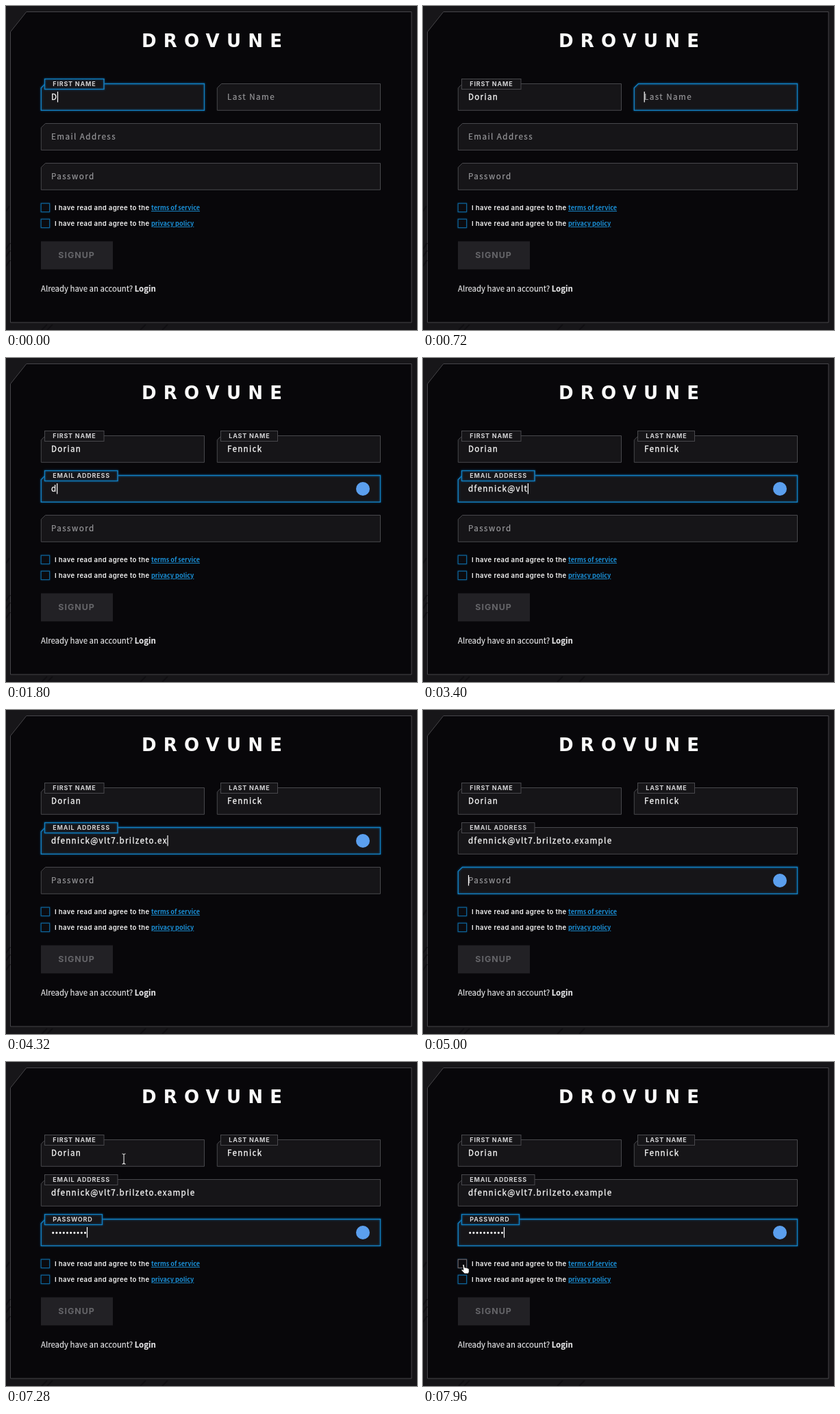
An HTML page for the animation above (8 s loop, 600x473 px).

```html
<!DOCTYPE html>
<html lang="en">
<head>
<meta charset="utf-8">
<title>Signup form</title>
<style>
  html, body { margin: 0; width: 100%; height: 100%; overflow: hidden; background: #171619; }
  svg { display: block; width: 600px; height: 473px; }
  text { white-space: pre; }
  .body { font-family: "Noto Sans CJK JP", "Noto Sans CJK SC", "Noto Sans CJK", "Open Sans", sans-serif; }
  .ui { font-family: Inter, Roboto, sans-serif; }
  .brand { font: bold 26px "DejaVu Sans", sans-serif; letter-spacing: 10.2px; fill: #fafafa; }
  .value { font-size: 11.6px; letter-spacing: 1.3px; fill: #f6f6f6; stroke: #f6f6f6; stroke-width: .3px; }
  .hint { font-size: 11.6px; letter-spacing: 1.45px; fill: #98989b; stroke: #98989b; stroke-width: .2px; }
  .tag { font-size: 9px; font-weight: 700; letter-spacing: .8px; fill: #d0d0d2; }
  .terms { font-size: 9.6px; font-weight: 600; letter-spacing: .37px; fill: #f4f4f4; }
  .link { font-size: 9.1px; font-weight: 700; fill: #1a8fd6; text-decoration: underline; }
  .login { font-size: 11.4px; fill: #e6e6e8; stroke: #e6e6e8; stroke-width: .15px; }
  .submit { font-size: 12.4px; font-weight: 700; letter-spacing: 1px; fill: #656569; }
  .box { fill: #161518; stroke: #48484c; }
  .focus { fill: none; stroke: #1180c2; stroke-width: 1.3; filter: drop-shadow(0 0 1.8px #0a5f9c); }
  .check { fill: #0b0b0f; stroke: #0f6aa2; filter: drop-shadow(0 0 1px #0a4a78); }
  .dots { fill: none; stroke: #f6f6f6; stroke-width: 3.2; stroke-linecap: round; stroke-dasharray: 0 5.2; }
  .caret { fill: #fff; }
</style>
</head>
<body>
<svg viewBox="0 0 600 473">
  <rect width="600" height="473" fill="#171619"/>
  <path d="M29.8 8.5H592V462H6.5V37.8Z" fill="#08070a" stroke="#464549"/>
  <path d="M0 300l5-8M0 355l6-9M0 366l6-9M0 380l6-9M52 473l8-8M60 473l8-8M196 473l8-8M228 473l8-8" stroke="#100f12" stroke-width="2"/>
  <text class="brand" x="198" y="59.5">DROVUNE</text>

  <g id="fields"></g>

  <rect id="check" class="check" x="51.2" y="288.2" width="12.4" height="12.4"/>
  <rect class="check" x="51.2" y="311.2" width="12.4" height="12.4"/>
  <g class="ui terms">
    <text x="71" y="298">I have read and agree to the</text>
    <text x="71" y="321">I have read and agree to the</text>
  </g>
  <g class="body link">
    <text x="212" y="298">terms of service</text>
    <text x="212" y="321">privacy policy</text>
  </g>

  <rect x="51" y="343.5" width="105" height="41" fill="#222125"/>
  <text class="ui submit" x="76.3" y="368.4">SIGNUP</text>
  <text class="body login" x="51" y="416.5">Already have an account? <tspan font-weight="700">Login</tspan></text>

  <circle id="badge" cx="521" r="10" fill="#5b9fee"/>
  <rect id="caret" class="caret" width="1.2" height="15.5"/>

  <g id="pointer">
    <path id="beam" d="M-2.5-7.5Q0-7.5 0-5.5V5.5Q0 7.5-2.5 7.5M2.5-7.5Q0-7.5 0-5.5M0 5.5Q0 7.5 2.5 7.5" fill="none" stroke="#e4e4e4" stroke-width="1.1"/>
    <path id="arrow" d="M0 0V12L2.8 9.4 4.7 13.7 6.7 12.8 4.8 8.6H8.6Z" fill="#000" stroke="#fff" stroke-width=".9"/>
    <path id="hand" d="M-1.2 0Q0-1.6 1.2 0L2 4.4Q3.3 3.2 4.2 4.7 5.5 3.8 6.3 5.3 8 4.8 8.2 6.6L8.4 10 7.4 13H1.6L-3 8.2Q-3.4 6.4-1.6 6.8L-.2 7.8Z" fill="#fff" stroke="#000" stroke-width=".9"/>
  </g>
</svg>
<script>
const LOOP = 8000, FADE = 160, TAG_TIME = 180, DOT = 5.2;
const $ = id => document.getElementById(id);
const clamp = v => Math.min(1, Math.max(0, v));
const ease = v => v * v * (3 - 2 * v);
const ramp = (t, start, length) => ease(clamp((t - start) / length));

function add(parent, tag, attrs, text) {
  const el = document.createElementNS("http://www.w3.org/2000/svg", tag);
  for (const key in attrs) el.setAttribute(key, attrs[key]);
  if (text) el.textContent = text;
  return parent.appendChild(el);
}

// Each run is [first key time, last key time, keys]; "<" deletes one character.
function keystrokes(runs) {
  const steps = [];
  let text = "";
  for (const [from, to, keys] of runs) {
    [...keys].forEach((key, i) => {
      text = key === "<" ? text.slice(0, -1) : text + key;
      const at = from + (to - from) * i / Math.max(1, keys.length - 1);
      steps.push({ at: Math.round(at / 40) * 40, text });
    });
  }
  return steps;
}

const fields = [
  { name: "First Name", x: 51, y: 113, w: 239, tagW: 86.5, on: -1000, off: 560, tagAt: -1000,
    runs: [[0, 0, "D"], [40, 400, "orian"]] },
  { name: "Last Name", x: 308, y: 113, w: 239, tagW: 83, on: 560, off: 1440, tagAt: 800,
    runs: [[800, 1240, "Fennick"]] },
  { name: "Email Address", x: 51, y: 171, w: 496, tagW: 106.5, on: 1440, off: 4840, tagAt: 1600, badge: true,
    runs: [[1600, 1600, "d"], [1840, 2200, "fen"], [2280, 2440, "nick"], [2720, 2720, "@"],
           [2880, 2960, "vmo"], [3120, 3400, "<<lt"], [3560, 4320, "7.brilzeto.ex"], [4440, 4680, "ample"]] },
  { name: "Password", x: 51, y: 229, w: 496, tagW: 84, on: 4840, off: Infinity, tagAt: 5560, badge: true, secret: true,
    runs: [[5560, 5560, "*"], [5680, 6000, "****"], [6200, 6200, "*"], [6400, 6680, "<****"], [6840, 6840, "*"]] }
];

function build(f) {
  const { x, y, w } = f, g = add($("fields"), "g", {});
  const outline = `M${x + 6.5} ${y + .5}H${x + w - .5}V${y + 39.3}H${x + .3}V${y + 6.5}Z`;
  add(g, "path", { class: "box", d: outline });
  f.ring = add(g, "path", { class: "focus", d: outline });
  f.hint = add(g, "text", { class: "body hint", x: x + 15, y: y + 24.3 }, f.name);
  f.value = f.secret
    ? add(g, "path", { class: "dots" })
    : add(g, "text", { class: "body value", x: x + 15, y: y + 24.3 });
  f.tag = add(g, "g", {});
  const rect = { x: x + 5.5, y: y - 6.5, width: f.tagW, height: 15 };
  add(f.tag, "rect", { class: "box", ...rect });
  f.tagRing = add(f.tag, "rect", { class: "focus", ...rect });
  add(f.tag, "text", { class: "ui tag", x: x + 17.3, y: y + 4.1 }, f.name.toUpperCase());
  f.steps = keystrokes(f.runs);
  f.text = null;
}

// Shows the typed text and keeps its width for the caret.
function setText(f, text) {
  if (text === f.text) return;
  f.text = text;
  f.hint.style.display = text ? "none" : "";
  if (f.secret) {
    const n = text.length;
    f.value.setAttribute("d", n ? `M${f.x + 17.7} ${f.y + 20.3}h${(n - 1) * DOT + .01}` : "");
    f.width = n * DOT + .3;
  } else {
    f.value.textContent = text;
    f.width = text ? f.value.getComputedTextLength() : 0;
  }
}

function drawField(f, t) {
  const focus = ramp(t, f.on, FADE) * (1 - ramp(t, f.off, FADE));
  const shown = ramp(t, f.tagAt, TAG_TIME);
  const last = f.steps.filter(s => s.at <= t).pop();
  setText(f, last ? last.text : "");
  f.ring.style.opacity = f.tagRing.style.opacity = focus;
  f.tag.style.opacity = shown;
  f.tag.setAttribute("transform", `translate(0 ${8 * (1 - shown)})`);
}

function drawPointer(t) {
  const k = ramp(t, 7100, 850);
  const x = 187 - 128 * k, y = 121 + 175 * k;
  const overCheck = x < 66 && y > 286;
  const overField = fields.some(f => x > f.x && x < f.x + f.w && y > f.y && y < f.y + 40);
  const kind = overCheck ? "hand" : overField ? "beam" : "arrow";
  for (const id of ["beam", "arrow", "hand"]) $(id).style.display = id === kind ? "" : "none";
  $("pointer").style.display = t < 7120 ? "none" : "";
  $("pointer").setAttribute("transform", `translate(${x} ${y})`);
  $("check").style.stroke = overCheck && t >= 7120 ? "#7c6c6a" : "";
}

function draw(t) {
  fields.forEach(f => drawField(f, t));
  const active = fields.find(f => t >= f.on && t < f.off);
  $("caret").setAttribute("x", active.x + 15 + active.width - .4);
  $("caret").setAttribute("y", active.y + 12);
  $("badge").setAttribute("cy", active.y + 20);
  $("badge").style.opacity = active.badge ? ramp(t, active.on + 40, 120) : 0;
  drawPointer(t);
}

fields.forEach(build);
const start = performance.now();
(function tick() {
  draw((performance.now() - start) % LOOP);
  requestAnimationFrame(tick);
})();
</script>
</body>
</html>
```
